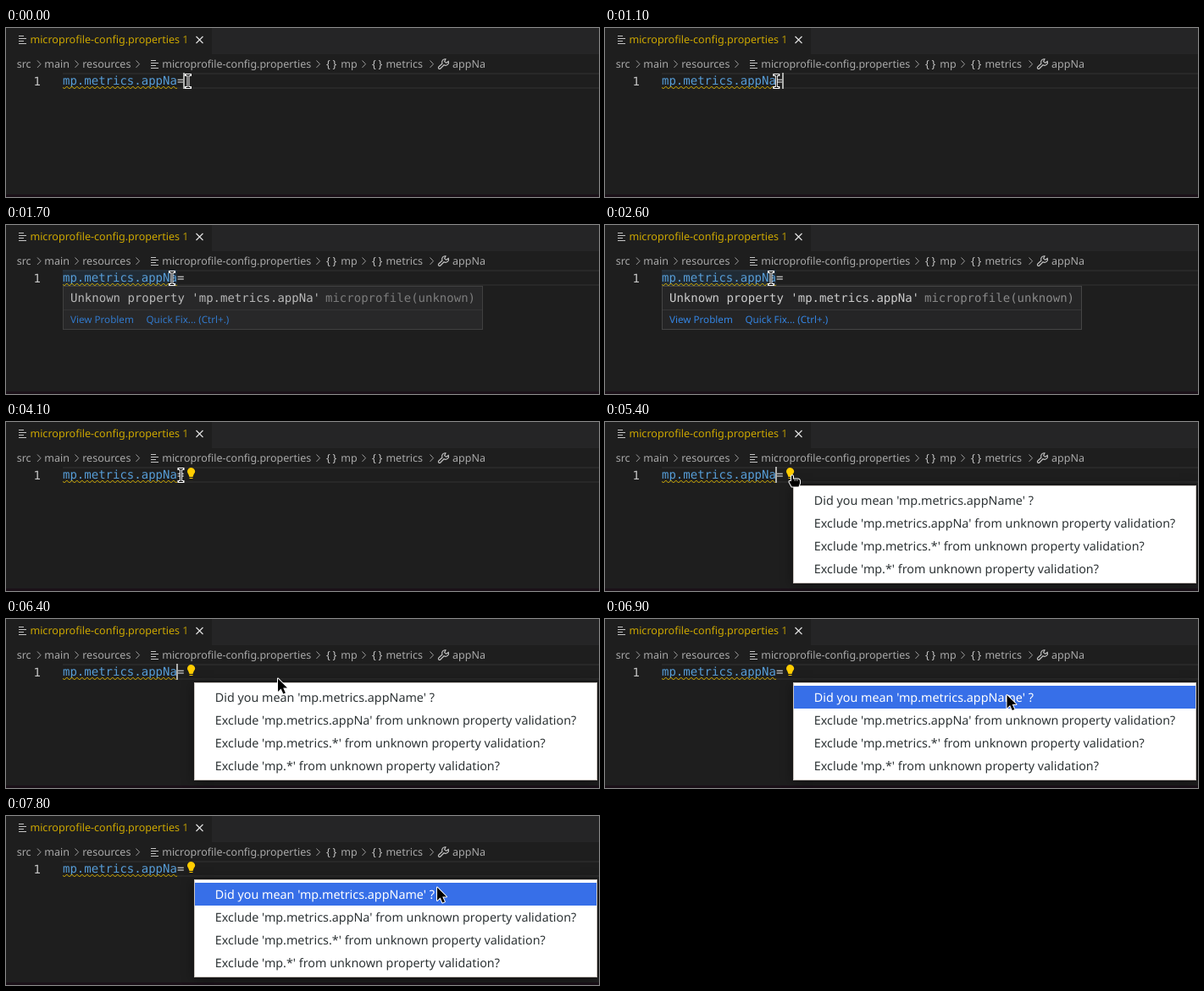
An HTML page with a canvas for the animation above (8000 ms loop, 700 by 200 pixels).

```html
<!DOCTYPE html>
<html lang="en">
<head>
<meta charset="utf-8">
<style>
html, body { margin: 0; width: 700px; height: 200px; overflow: hidden; background: #1e1e1e; }
canvas { display: block; }
</style>
</head>
<body>
<canvas id="stage" width="700" height="200"></canvas>
<script>
const ctx = document.getElementById('stage').getContext('2d');
const LOOP = 8000, STEP = 100;
const MONO = '14px "DejaVu Sans Mono", monospace';
const ui = size => `${size}px "Noto Sans", sans-serif`;
const LABEL = ui(12.5), ACTION = ui(11.65), ITEM = ui(14.33);
ctx.textRendering = 'geometricPrecision';

const BLINKS = [500, 1000, 1500, 2000, 2600, 3100, 3700, 4200, 4700, 5200, 5700, 6200, 6800, 7300, 7800];
const HOVER_ON = 1700, HOVER_OFF = 3000, CLICK = 3200, BULB_ON = 3500;
const HAND_ON = 4300, MENU_ON = 5400, ARROW_ON = 6000, SELECT_ON = 6600;
// time, x, y of the pointer
const PATH = [
  [700, 215, 63], [1300, 196, 63], [2800, 196, 63], [3200, 202.5, 63], [4000, 202.5, 63],
  [4100, 206.5, 63], [4300, 222, 63], [4900, 222, 63], [5100, 224, 63], [5200, 221, 62],
  [5900, 221, 62], [6400, 321, 70], [6600, 410, 84], [6800, 466, 90], [7200, 500, 88], [7500, 509, 84]
];
const MENU = [
  "Did you mean 'mp.metrics.appName' ?",
  "Exclude 'mp.metrics.appNa' from unknown property validation?",
  "Exclude 'mp.metrics.*' from unknown property validation?",
  "Exclude 'mp.*' from unknown property validation?"
];
const CRUMBS = [
  ['src', 12.7], ['main', 45.2], ['resources', 90.2], ['microprofile-config.properties', 184.2],
  ['mp', 395.2], ['metrics', 448.4], ['appNa', 527]
];

function box(x, y, w, h, color) {
  ctx.fillStyle = color;
  ctx.fillRect(x, y, w, h);
}

function text(str, x, y, color, font) {
  ctx.font = font;
  ctx.fillStyle = color;
  ctx.fillText(str, x, y);
}

function stroke(d, color, width = 1) {
  ctx.strokeStyle = color;
  ctx.lineWidth = width;
  ctx.stroke(new Path2D(d));
}

function fileIcon(x, y) {
  [6, 9, 6, 9].forEach((w, i) => box(x, y + i * 3, w, 1, '#c5c5c5'));
}

function drawHeader() {
  box(0, 0, 700, 200, '#1e1e1e');
  box(243, 0, 457, 31, '#252526');
  box(0, 197, 700, 3, '#1a1018');
  fileIcon(15, 9);
  text('microprofile-config.properties', 28.4, 18, '#cca700', ui(12.55));
  text('1', 208.3, 18, '#b09205', LABEL);
  stroke('M224.5 10l8 8m0-8l-8 8', '#e0e0e0', 1.2);

  CRUMBS.forEach(([name, x]) => text(name, x, 47, '#a9a9a9', LABEL));
  for (const x of [37, 81.5, 153.5, 366.5, 420.5, 500.5]) stroke(`M${x} 38.5l4 4.2l-4 4.2`, '#a0a0a0');
  fileIcon(171, 38);
  for (const x of [378, 432]) {
    text('{', x, 47, '#c5c5c5', LABEL);
    text('}', x + 7.5, 47, '#c5c5c5', LABEL);
  }
  stroke('M519 36.8A3.7 3.7 0 0 0 515 42L510.8 46a1.4 1.4 0 0 0 2 2L517 43.8A3.7 3.7 0 0 0 522.3 39.3L519.7 41.4L517.6 39.6Z', '#c5c5c5', 1.1);
}

function drawSquiggle() {
  ctx.save();
  ctx.beginPath();
  ctx.rect(67, 69, 135, 3);
  ctx.clip();
  stroke('M65.75 69' + 'l3 3l3-3'.repeat(23), '#cca700');
  ctx.restore();
}

function drawCode(t) {
  box(67, 53, 633, 2, '#282828');
  box(67, 70, 633, 2, '#282828');
  if (t >= HOVER_ON && t < HOVER_OFF) box(67, 53, 135, 19, 'rgba(38,79,120,.25)');
  text('1', 32.6, 68, '#c6c6c6', MONO);
  text('mp.metrics.appNa', 67, 67, '#569cd6', MONO);
  text('=', 201.9, 67, '#d4d4d4', MONO);
  drawSquiggle();
  const blinks = BLINKS.filter(time => time <= t).length;
  if (blinks % 2 === 0) box(t < CLICK ? 209 : 201, 53, 2, 19, '#aeafad');
}

function drawHover(t) {
  ctx.globalAlpha = t < HOVER_ON + STEP ? .87 : 1;
  box(67, 72, 496, 52, '#454545');
  box(68, 73, 494, 50, '#252526');
  box(68, 100, 494, 1, '#363637');
  text("Unknown property 'mp.metrics.appNa'", 76, 91, '#cccccc', MONO);
  text('microprofile(unknown)', 377, 91, '#898989', MONO);
  text('View Problem', 76, 116, '#3485e3', ACTION);
  text('Quick Fix... (Ctrl+.)', 165.5, 116, '#3485e3', ACTION);
  ctx.globalAlpha = 1;
}

function drawBulb() {
  ctx.fillStyle = '#ffcc00';
  ctx.beginPath();
  ctx.arc(218.5, 58.5, 4.5, 2.4, .75);
  ctx.lineTo(220.5, 65);
  ctx.lineTo(216.5, 65);
  ctx.fill();
  box(216.5, 66, 4, 1, '#ffcc00');
}

function drawMenu(t) {
  ctx.save();
  ctx.shadowColor = 'rgba(0,0,0,.45)';
  ctx.shadowBlur = 14;
  ctx.shadowOffsetY = 2;
  box(222, 75, 476, 116, '#cdc7c2');
  ctx.restore();
  box(223, 76, 474, 114, '#ffffff');
  const selected = t >= SELECT_ON;
  if (selected) box(223, 79, 474, 27, '#376fe8');
  MENU.forEach((item, i) =>
    text(item, 246.8, 98 + i * 27, selected && i === 0 ? '#ffffff' : '#2e3436', ITEM));
}

function pointerAt(t) {
  const next = PATH.findIndex(key => key[0] > t);
  if (next === 0) return PATH[0].slice(1);
  if (next < 0) return PATH[PATH.length - 1].slice(1);
  const [t0, x0, y0] = PATH[next - 1], [t1, x1, y1] = PATH[next];
  const k = (t - t0) / (t1 - t0);
  return [x0 + (x1 - x0) * k, y0 + (y1 - y0) * k];
}

function outlined(d) {
  ctx.lineJoin = 'round';
  stroke(d, '#ffffff', 2);
  ctx.fillStyle = '#000000';
  ctx.fill(new Path2D(d));
}

function drawPointer(t) {
  ctx.save();
  ctx.translate(...pointerAt(t));
  if (t < HAND_ON) {
    const beam = 'M-2.5-7.5h5M0-7.5v15M-2.5 7.5h5';
    ctx.lineCap = 'square';
    stroke(beam, '#ffffff', 3);
    ctx.lineCap = 'butt';
    stroke(beam, '#000000');
  } else if (t < ARROW_ON) {
    outlined('M-1 2q1-1.5 2 0v3.5h5.5q2.5 0 2.5 2.5v2.5l-1.5 4h-8l-3-5.5q0-1.5 1.5-1.5l1 1z');
    stroke('M3.2 5.5v2.5M5.8 5.5v2.5', '#ffffff', .7);
  } else {
    outlined('M0 .5v15.5l3.6-3.4l2.7 6l2.6-1.2l-2.7-5.8h4.8z');
  }
  ctx.restore();
}

function frame(now) {
  const t = Math.floor(now % LOOP / STEP) * STEP;
  drawHeader();
  drawCode(t);
  if (t >= HOVER_ON && t < HOVER_OFF) drawHover(t);
  if (t >= BULB_ON) drawBulb();
  if (t >= MENU_ON) drawMenu(t);
  drawPointer(t);
  requestAnimationFrame(frame);
}
requestAnimationFrame(frame);
</script>
</body>
</html>
```
